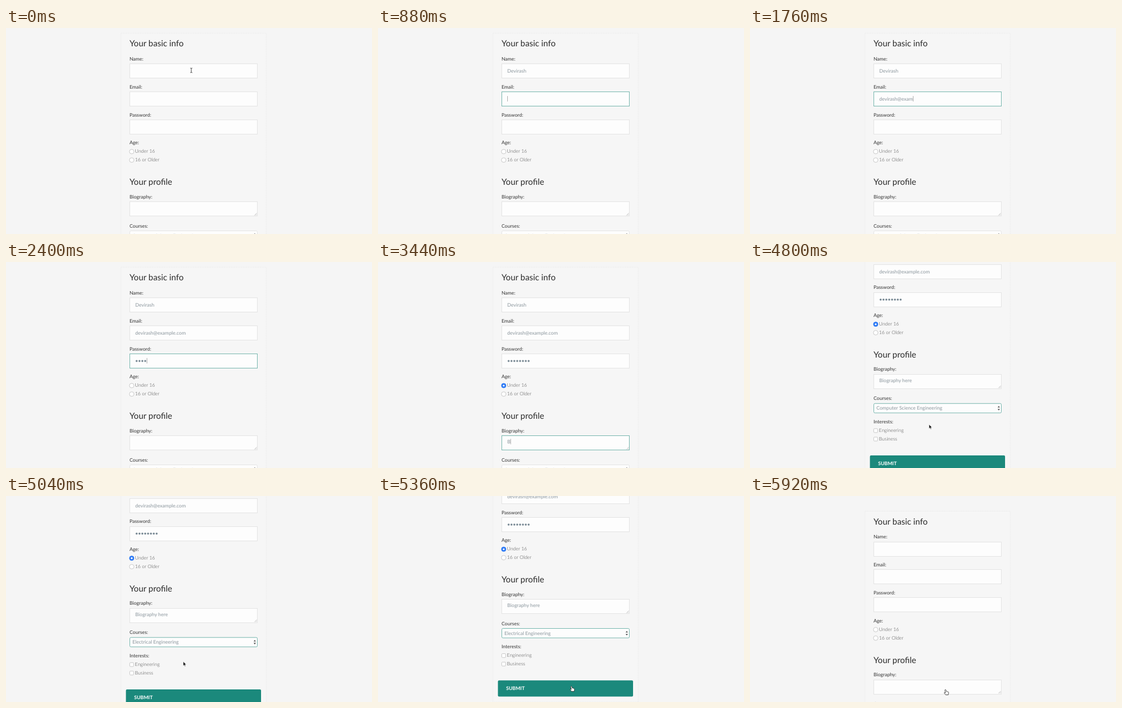
These frames come from a looping animation (640 px wide and 360 px high, 6 s). An HTML page:

```html
<!DOCTYPE html>
<html lang="en">
<head>
<meta charset="utf-8">
<title>Sign-up form</title>
<style>
  html, body { margin: 0; width: 100%; height: 100%; overflow: hidden; background: #f5f5f5; }
  svg { display: block; width: 640px; height: 360px; }
  text {
    font: 400 8.5px Lato, sans-serif; fill: #333;
    white-space: pre; text-rendering: geometricPrecision;
  }
  .title { font-size: 14.8px; fill: #2a2a2a; }
  .light { font-weight: 300; fill: #484848; }
  .value { font-size: 8.6px; fill: #8b969d; }
  .submit { font-size: 8.6px; font-weight: 700; fill: #fff; }
  .field { fill: #fdfdfd; stroke: #e4e4e4; shape-rendering: crispEdges; }
  .field.focus { stroke: #78b7af; }
  .field[rx] { shape-rendering: auto; }
  .mark { fill: #fff; stroke: #bdbdbd; stroke-width: .8; }
  .mark.checked { fill: #2f7bf5; stroke: #2f7bf5; }
  .grip { fill: none; stroke: #999; stroke-width: .6; }
  .caret { fill: #999; }
  .dot { fill: #7b8b96; }
</style>
</head>
<body>
<svg viewBox="0 0 640 360">
  <g id="page">
    <rect x="201" y="9" width="254" height="474" fill="#f6f6f6" stroke="#ececec" stroke-dasharray="2 1"/>
    <g id="form"></g>
    <rect id="caret" class="caret" width=".8" height="9.5"/>
  </g>
  <g id="pointer">
    <path id="beam" d="M-1.8-4Q0-4 0-3V3Q0 4-1.8 4M1.8-4Q0-4 0-3M0 3Q0 4 1.8 4" fill="none" stroke="#333" stroke-width=".9"/>
    <path id="arrow" d="M0 0V7.2L1.7 5.7L2.8 8.2L4 7.7L2.9 5.2H5.2Z" fill="#111" stroke="#fff" stroke-width=".5"/>
    <path id="hand" d="M-1.8-4.5Q-.9-5.2-.4-4L.4-1.4Q2-2 2.4-.9Q4.2-1.2 4.3 .6L3.7 4.5H-.8L-3.4 1.2Q-3.5 .2-2.3 .4L-1.2 1.1L-2.3-3.6Z" fill="#fff" stroke="#222" stroke-width=".8"/>
  </g>
</svg>
<script>
const LOOP = 6000, STEP = 80, RESET = 5920;
const ROW = 48.9, CHOICE = 14.8, DOT = 5;
const byId = id => document.getElementById(id);
const show = (el, on) => { el.style.display = on ? '' : 'none'; };

function add(tag, attrs, text = '') {
  const el = document.createElementNS('http://www.w3.org/2000/svg', tag);
  for (const key in attrs) el.setAttribute(key, attrs[key]);
  el.textContent = text;
  return byId('form').appendChild(el);
}
const write = (x, y, text, cls = '') => add('text', { x, y, class: cls }, text);

// A labelled box; `time` holds when it gains and loses focus.
function field(label, y, time, { height = 25, base = 15.5, x = 226, ...extra } = {}) {
  write(216, y - 5.8, label);
  const box = add('rect', { x: 216.5, y, width: 223, height, class: 'field', ...extra });
  return { box, value: write(x, y + base, '', 'value'), base: y + base, time };
}

function choices(label, y, names, mark) {
  write(216, y - 12.8, label);
  return names.map((name, i) => {
    const cy = y + i * CHOICE;
    write(225.6, cy + 2.3, name, 'light');
    return mark(cy);
  });
}
const circle = cy => add('circle', { cx: 219.8, cy, r: 4, class: 'mark' });
const square = cy =>
  add('rect', { x: 216.4, y: cy - 3.3, width: 6.8, height: 6.8, rx: 1.2, class: 'mark' });

write(216, 32.3, 'Your basic info', 'title');
write(216, 274.3, 'Your profile', 'title');
const name = field('Name:', 62.5, [160, 880]);
const email = field('Email:', 62.5 + ROW, [880, 2240]);
const password = field('Password:', 62.5 + 2 * ROW, [2240, 3040]);
const bio = field('Biography:', 303.5, [3280, 4720], { base: 13.5 });
const course = field('Courses:', 354.5, [4720, RESET], { height: 16.5, base: 11.2, x: 221, rx: 2 });
const fields = [name, email, password, bio, course];

const dots = Array.from({ length: 8 }, (_, i) =>
  add('circle', { cx: 228.4 + i * DOT, cy: password.base - 2.8, r: 1.8, class: 'dot' }));
add('path', { d: 'M434.5 327.5L438.5 323.5M436.8 327.5L438.5 325.8', class: 'grip' });
add('path', { d: 'M433 361.6L435 358.8L437 361.6ZM433 363.9L435 366.7L437 363.9Z', fill: '#555' });

const [radio] = choices('Age:', 216, ['Under 16', '16 or Older'], circle);
const radioDot = add('circle', { cx: 219.8, cy: 216, r: 1.6, fill: '#fff' });
choices('Interests:', 401.8, ['Engineering', 'Business'], square);
add('rect', { x: 209.7, y: 445.2, width: 236.3, height: 28.3, rx: 2, fill: '#1b897c' });
write(224, 462.4, 'SUBMIT', 'submit');

const between = (t, from, to) => t >= from && t < to;
const easeOut = (t, start, length) => {
  const left = 1 - Math.min(1, Math.max(0, (t - start) / length));
  return 1 - left * left;
};
const typed = (t, start, perChar) => Math.max(0, Math.floor((t - start) / perChar));

// Pointer stops: time of leaving for the stop, x, y.
const stops = [[0, 324, 74], [2480, 322, 148], [2720, 221, 214], [3040, 300, 316],
  [3920, 317, 277], [4720, 310, 289.5], [5200, 343, 343]];

function pointerAt(t) {
  return stops.reduce(([x, y], [start, toX, toY]) => {
    const k = easeOut(t, start, 240);
    return [x + (toX - x) * k, y + (toY - y) * k];
  }, stops[0].slice(1));
}

function pointerShape(t) {
  if (between(t, 240, 2720) || between(t, 3440, 4000)) return '';
  if (t < 240) return 'beam';
  return t < 5360 ? 'arrow' : 'hand';
}

function draw(time) {
  const t = Math.floor((time % LOOP) / STEP) * STEP;
  const fresh = t >= RESET;
  const filled = fresh ? 0 : t;
  const y = fresh ? -17.5 : 107.3 * easeOut(t, 3920, 900) + 15.7 * easeOut(t, 5120, 160);
  byId('page').setAttribute('transform', `translate(0 ${-y})`);

  name.value.textContent = 'Devirash'.slice(0, typed(filled, 160, 80));
  email.value.textContent = 'devirash@example.com'.slice(0, typed(filled, 960, 60));
  bio.value.textContent = 'Biography here'.slice(0, typed(filled, 3400, 40));
  course.value.textContent = (filled < 4960 ? 'Computer Science' : 'Electrical') + ' Engineering';
  const count = Math.min(dots.length, typed(filled, 2240, 40));
  dots.forEach((dot, i) => show(dot, i < count));

  const checked = filled >= 3040;
  radio.classList.toggle('checked', checked);
  show(radioDot, checked);

  const active = fields.find(f => between(t, ...f.time));
  for (const f of fields) f.box.classList.toggle('focus', f === active);
  const hasCaret = active && active !== course;
  show(byId('caret'), hasCaret);
  if (hasCaret) {
    const width = active === password ? count * DOT : active.value.getComputedTextLength();
    byId('caret').setAttribute('x', 226 + width);
    byId('caret').setAttribute('y', active.base - 8);
  }

  const shape = pointerShape(t);
  for (const id of ['beam', 'arrow', 'hand']) show(byId(id), id === shape);
  byId('pointer').setAttribute('transform', `translate(${pointerAt(t)})`);
}

function tick() {
  draw(performance.now());
  requestAnimationFrame(tick);
}
tick();
</script>
</body>
</html>
```
